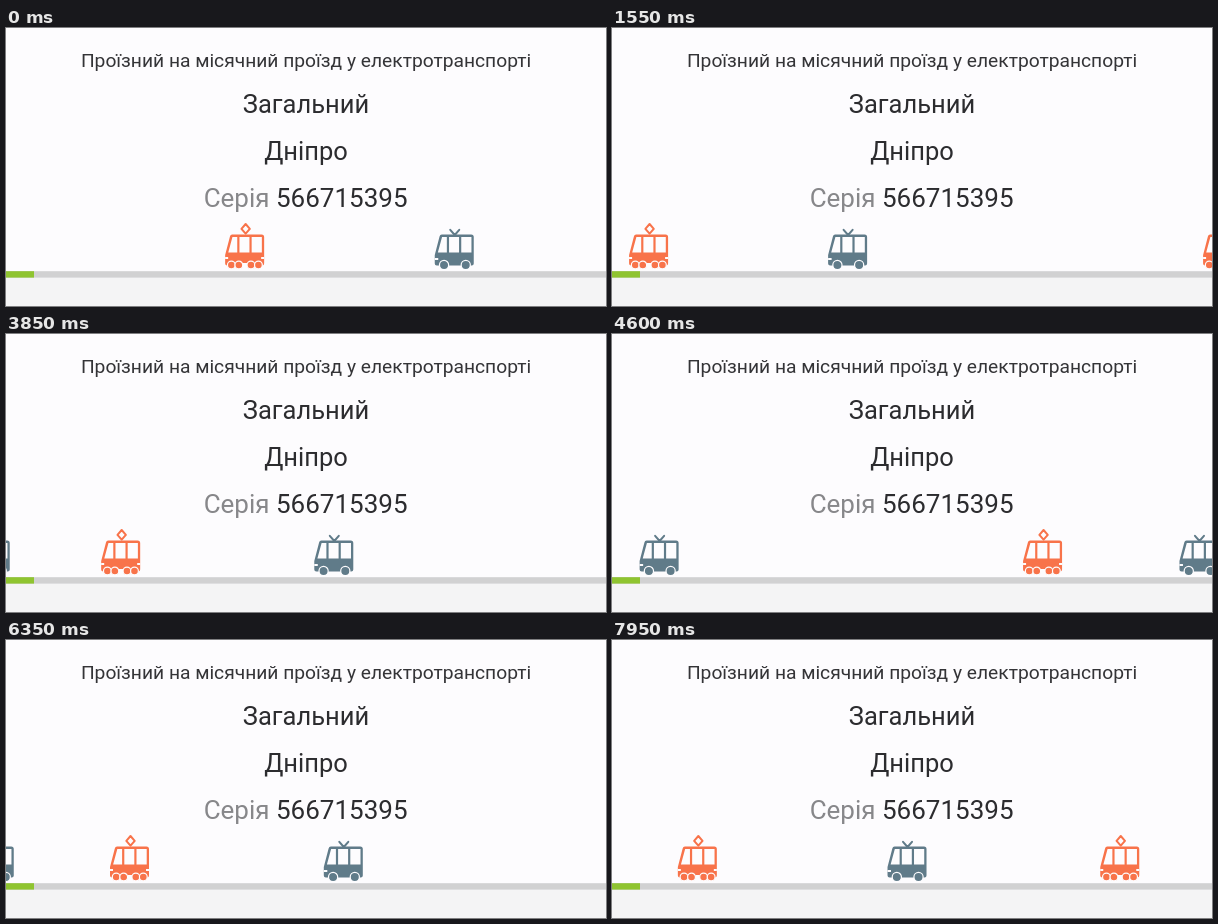
Recreate the animation shown at these times as an HTML page. Size 600 px wide and 278 px high, loop 8 s.

```html
<!DOCTYPE html>
<html lang="uk">
<head>
<meta charset="utf-8">
<title>Проїзний</title>
<style>
  html, body { margin: 0; width: 100%; height: 100%; overflow: hidden; background: #fdfcfe; }
  svg { display: block; width: 600px; height: 278px; }
  text { font-family: Roboto, sans-serif; font-size: 25.5px; fill: #2c2c2f; text-anchor: middle; }
  .title { font-size: 19.23px; fill: #343437; }
  .series { font-size: 26px; }
  .label { fill: #87878a; }
  .tram { color: #f8734a; }
  .bus { color: #607b89; }
  .fill { fill: currentColor; }
  .line { fill: none; stroke: currentColor; stroke-width: 2; stroke-linejoin: round; stroke-linecap: round; }
  .glass { fill: #fdfcfe; }
  .wheel { fill: currentColor; stroke: #fdfcfe; stroke-width: 1.2; }
</style>
</head>
<body>
<svg viewBox="0 0 600 278">
  <defs>
    <g id="cabin">
      <path class="fill" d="M-12.5 206.5H17Q19.5 206.5 19.5 209V235.5Q19.5 237.5 17.5 237.5H-17.5Q-19.5 237.5 -19.5 235.5V227L-14.7 208.5Q-14.3 206.5 -12.5 206.5Z"/>
      <path class="glass" d="M-12.2 209H-7.4V224.5H-16.4ZM-5.2 209H4.8V224.5H-5.2ZM7 209H17.2V224.5H7Z"/>
    </g>
    <g id="tram">
      <path class="line" d="M1 196L5.2 200.8L1 205.6L-3.2 200.8Z"/>
      <use href="#cabin"/>
      <path class="glass" d="M-19.5 229h3v2h-3zM16.5 229h3v2h-3zM-2 235h4.5v3h-4.5z"/>
      <g class="wheel">
        <circle cx="-13.3" cy="237" r="3.9"/><circle cx="-5.8" cy="237" r="3.9"/>
        <circle cx="6.3" cy="237" r="3.9"/><circle cx="13.8" cy="237" r="3.9"/>
      </g>
    </g>
    <g id="bus">
      <path class="line" d="M-4 201.8L.5 207L5 201.8"/>
      <use href="#cabin"/>
      <path class="glass" d="M-19.5 230h3.5v2h-3.5z"/>
      <g class="wheel">
        <circle cx="-10.2" cy="237" r="4.6"/><circle cx="11.5" cy="237" r="4.6"/>
      </g>
    </g>
  </defs>

  <rect width="600" height="278" fill="#fdfcfe"/>
  <rect y="247" width="600" height="31" fill="#f4f4f5"/>
  <text class="title" x="300" y="39">Проїзний на місячний проїзд у електротранспорті</text>
  <text x="300" y="84.5">Загальний</text>
  <text x="300" y="132">Дніпро</text>
  <text class="series" x="299.6" y="179"><tspan class="label">Серія</tspan> 566715395</text>
  <rect y="243.2" width="600" height="6.4" fill="#d1d1d2"/>
  <rect y="243.2" width="28" height="6.4" fill="#8fc430"/>
  <g id="road"></g>
</svg>
<script>
  const LOOP = 8000, PERIOD = 2523, FOLLOW = 1025, CENTER = 300;

  // mid: when the first of each kind passes the centre; rate in rad/ms.
  const kinds = [
    { name: 'tram', mid: -140, reach: 380, rate: 0.00115 },
    { name: 'bus', mid: 370, reach: 346, rate: 0.0012 }
  ];

  const road = document.getElementById('road');
  const vehicles = kinds.flatMap(kind => [0, FOLLOW].map(delay => {
    const node = document.createElementNS('http://www.w3.org/2000/svg', 'use');
    node.setAttribute('href', '#' + kind.name);
    node.setAttribute('class', kind.name);
    road.append(node);
    return { ...kind, node, mid: kind.mid + delay };
  }));

  // Sine ease from right to left, fastest at the centre.
  function position({ mid, reach, rate }, time) {
    const turns = (time - mid) / PERIOD;
    const offset = (turns - Math.round(turns)) * PERIOD;
    return CENTER - reach * Math.sin(rate * offset);
  }

  const origin = performance.now();
  function draw(now) {
    const time = Math.max(0, now - origin) % LOOP;
    for (const v of vehicles) v.node.setAttribute('transform', `translate(${position(v, time).toFixed(2)} 0)`);
    requestAnimationFrame(draw);
  }
  draw(origin);
</script>
</body>
</html>
```
